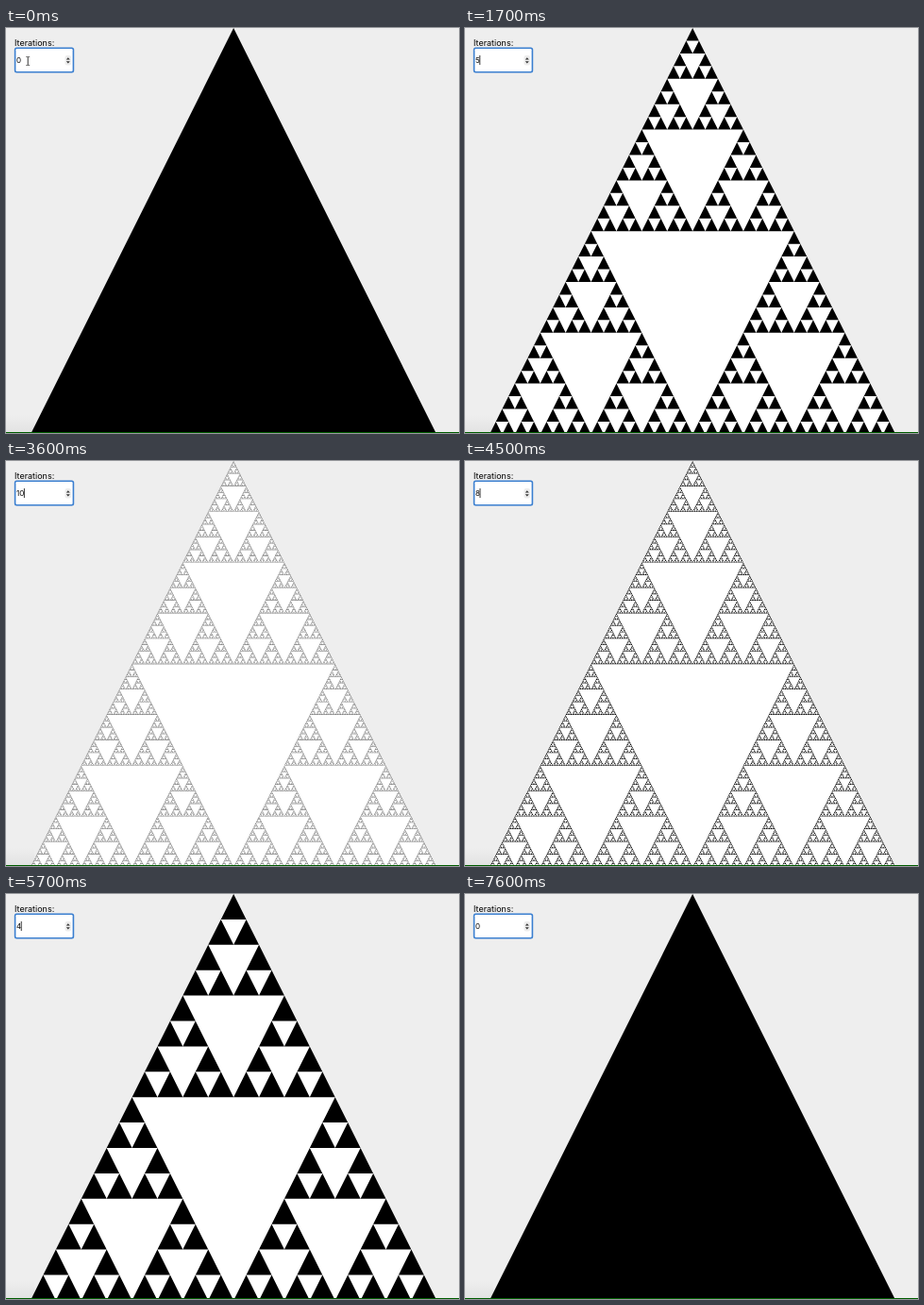
These frames come from a looping animation (480 by 429 pixels, 8.07 s). An HTML page with a canvas:

```html
<!DOCTYPE html>
<html lang="en">
<head>
<meta charset="utf-8">
<title>Triangle iterations</title>
<style>
html, body { margin: 0; width: 100%; height: 100%; overflow: hidden; background: #eee; }
canvas { display: block; }
</style>
</head>
<body>
<canvas id="stage" width="480" height="429"></canvas>
<script>
const ctx = document.getElementById('stage').getContext('2d');
const LOOP = 8070, TICK = 100;
const APEX = 241.15, SIDE = 430.4;

// Key points [ms, count]; presses are evenly spaced between them.
const keys = [[0, 0], [400, 2], [900, 2], [1300, 4], [3100, 9], [3600, 10],
              [3900, 10], [6000, 3], [6200, 2], [7100, 0], [LOOP, 0]];

function countAt(t) {
  const i = keys.findIndex(([at]) => at > t);
  const [t0, a] = keys[i - 1], [t1, b] = keys[i];
  const value = a + (b - a) * (t - t0) / (t1 - t0);
  return b < a ? Math.ceil(value) : Math.floor(value);
}

const caretAt = t => t >= 200 && !(t >= 800 && t < 1100) && t < 7600;

function rect(x, y, w, h, color) {
  ctx.fillStyle = color;
  ctx.fillRect(x, y, w, h);
}

function roundBox(x, y, w, h, r, color) {
  ctx.fillStyle = color;
  ctx.beginPath();
  ctx.roundRect(x, y, w, h, r);
  ctx.fill();
}

function text(str, x, y, size) {
  ctx.font = `${size}px Inter, sans-serif`;
  ctx.fillStyle = '#000';
  ctx.fillText(str, x, y);
}

function addTriangle(x, y, size, height = size) {
  ctx.moveTo(x, y);
  ctx.lineTo(x + size / 2, y + height);
  ctx.lineTo(x - size / 2, y + height);
  ctx.closePath();
}

// A cell is solid when its column's bits are all set in its row (Pascal mod 2).
function drawSierpinski(level) {
  const rows = 2 ** level, size = SIDE / rows;
  if (level) {
    ctx.fillStyle = '#fff';
    ctx.beginPath();
    addTriangle(APEX, 0, SIDE);
    ctx.fill();
  }
  ctx.fillStyle = '#000';
  ctx.beginPath();
  for (let r = 0; r < rows; r++)
    for (let c = 0; c <= r; c++)
      if ((r & c) === c) addTriangle(APEX + (c - r / 2) * size, r * size, size);
  ctx.fill();
}

function drawPointer(x, y) {
  rect(x - 0.5, y - 4, 1, 8, '#333');
  for (const end of [-4.8, 4]) rect(x - 2, y + end, 4, 0.8, '#555');
}

function drawInput(level, caret, pointer) {
  text('Iterations:', 9, 19, 9);
  roundBox(8.8, 20.5, 63.4, 27, 2.5, '#3b7fd0');
  roundBox(10.4, 22.1, 60.2, 23.8, 1.2, '#fff');
  text(level, 11, 37.3, 8);
  if (caret) rect(10.6 + ctx.measureText(level).width, 29, 0.9, 10, '#222');

  roundBox(62.5, 29, 6.5, 10.5, 2, '#ededed');
  ctx.fillStyle = '#333';
  ctx.beginPath();
  for (const dir of [-1, 1]) addTriangle(65.8, 34.3 + dir * 3.1, 4, -dir * 2.2);
  ctx.fill();

  if (pointer) drawPointer(23.2, 35);
}

function draw(level, caret, pointer) {
  ctx.filter = 'none';
  rect(0, 0, 480, 429, '#eee');
  const shade = ctx.createLinearGradient(0, 410, 0, 428);
  shade.addColorStop(0, '#eee');
  shade.addColorStop(1, '#e3e3e3');
  rect(0, 410, 30, 18, shade);
  // Slight softness of a scaled-down screen recording.
  ctx.filter = 'blur(0.5px)';
  drawSierpinski(level);
  ctx.filter = 'blur(0.3px)';
  drawInput(level, caret, pointer);
  ctx.filter = 'none';
  rect(0, 428, 480, 1, '#005c00');
}

let shown = '';
const start = performance.now();

function tick() {
  const elapsed = (performance.now() - start) % LOOP;
  const t = Math.floor(elapsed / TICK) * TICK;
  const state = [countAt(t), caretAt(t), t < 200];
  if (state.join() !== shown) {
    shown = state.join();
    draw(...state);
  }
  requestAnimationFrame(tick);
}
tick();
</script>
</body>
</html>
```
